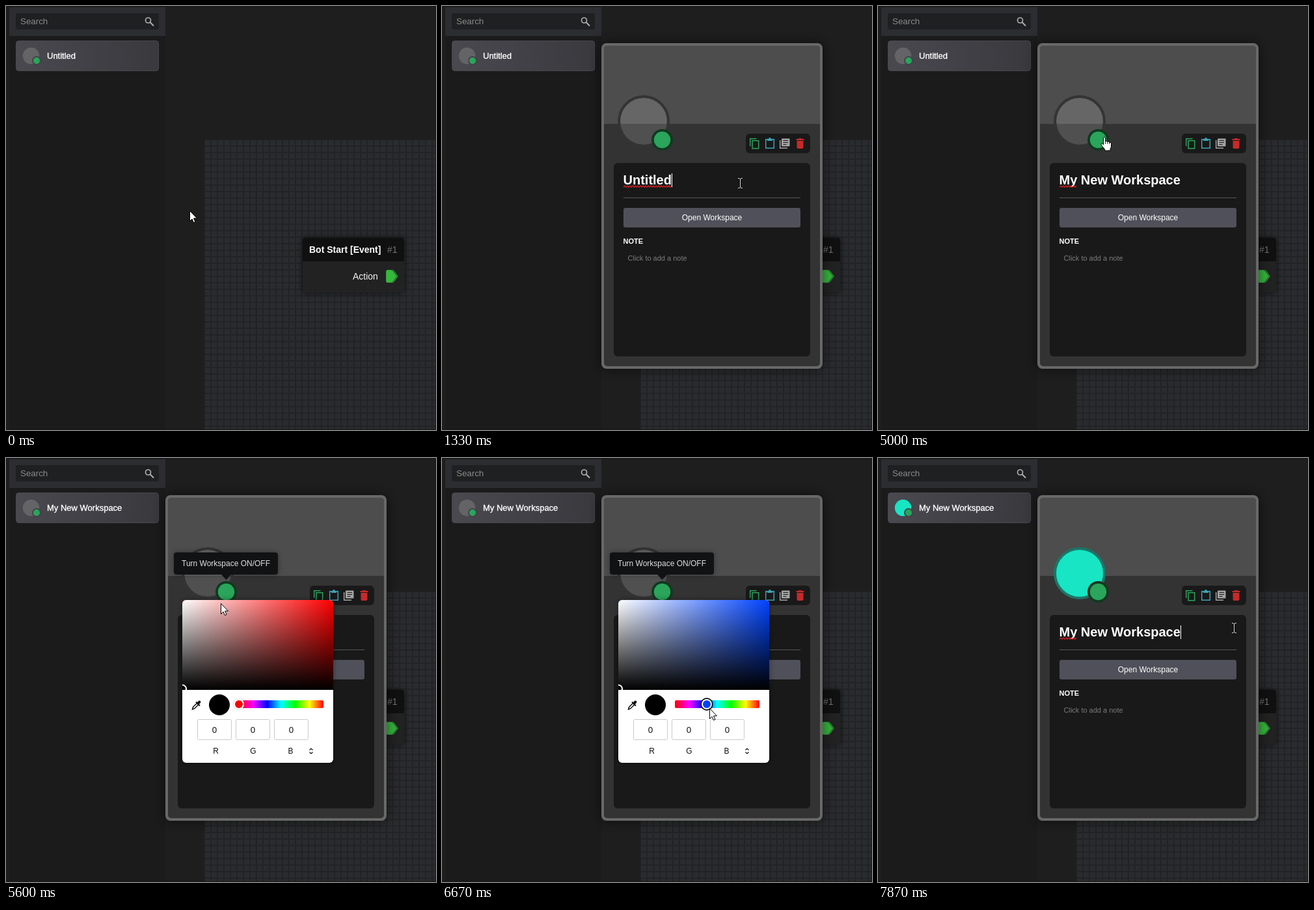
An HTML page with a canvas for the animation above (8 s loop, 661 by 651 pixels).

```html
<!DOCTYPE html>
<html lang="en">
<head>
<meta charset="utf-8">
<title>Workspace editor</title>
<style>
html, body { margin: 0; width: 100%; height: 100%; overflow: hidden; background: #1e1e1e; }
canvas { display: block; }
</style>
</head>
<body>
<canvas id="stage" width="661" height="651"></canvas>
<script>
const ctx = document.getElementById('stage').getContext('2d');
const LOOP = 8000, TICKS = 120, TICK = LOOP / TICKS;
const TITLE = 'My New Workspace';
const SANS = '"Liberation Sans", Arial, sans-serif';
const GREEN = '#2aa55b';
const TITLE_FONT = `bold 20px ${SANS}`;

// Moments, in ticks
const OPEN = 9, FOCUS = 20, SELECT = 24, CLEAR = 27, CARET_OFF = 72;
const PICK = 80, TIP = 82, HUE = 94, HUE_END = 102, SHADE = 107, SHADE_END = 110;
const TIP_OFF = 113, DONE = 118;
const STROKES = [32, 35, 37, 41, 43, 44, 46, 49, 53, 55, 56, 58, 60, 61, 64, 65];

// Pointer path: tick, x, y, shape
const PATH = [
  [0, 282, 314, 'arrow'], [6, 130, 170, 'arrow'], [9, 43, 73, 'hand'], [13, 43, 73, 'arrow'],
  [20, 458, 272, 'beam'], [71, 458, 272, 'arrow'], [75, 347, 201, 'hand'], [76, 347, 201, 'hand'],
  [79, 320, 184, 'hand'], [81, 322, 188, 'arrow'], [92, 365, 378, 'arrow'], [93, 365, 378, 'arrow'],
  [100, 411, 384, 'arrow'], [102, 430.5, 384, 'arrow'], [106, 472, 243, 'arrow'],
  [110, 480, 232, 'arrow'], [112, 480, 232, 'arrow'], [114, 512, 325, 'hand'],
  [116, 547, 261, 'beam'], [120, 547, 261, 'beam']
];

const clamp = v => Math.max(0, Math.min(1, v));

function pointerAt(n) {
  let i = 0;
  while (i < PATH.length - 2 && PATH[i + 1][0] <= n) i++;
  const [t0, x0, y0, shape] = PATH[i], [t1, x1, y1] = PATH[i + 1];
  const u = clamp((n - t0) / (t1 - t0)), k = u * u * (3 - 2 * u);
  return { x: x0 + (x1 - x0) * k, y: y0 + (y1 - y0) * k, shape };
}

function hsv(h, s, v) {
  return [5, 3, 1].map(n => {
    const k = (n + h / 60) % 6;
    return Math.round(255 * v * (1 - s * clamp(Math.min(k, 4 - k))));
  });
}
const rgb = c => `rgb(${c.join(',')})`;

function rect(x, y, w, h, fill) {
  ctx.fillStyle = fill;
  ctx.fillRect(x, y, w, h);
}
function box(x, y, w, h, r, fill, stroke) {
  ctx.beginPath();
  ctx.roundRect(x, y, w, h, r);
  paint(fill, stroke);
}
function disc(x, y, r, fill, stroke, width) {
  ctx.beginPath();
  ctx.arc(x, y, r, 0, 7);
  paint(fill, stroke, width);
}
function shape(d, fill, stroke, width) {
  const p = new Path2D(d);
  if (fill) { ctx.fillStyle = fill; ctx.fill(p); }
  if (stroke) { ctx.strokeStyle = stroke; ctx.lineWidth = width || 1; ctx.stroke(p); }
}
function paint(fill, stroke, width) {
  if (fill) { ctx.fillStyle = fill; ctx.fill(); }
  if (stroke) { ctx.strokeStyle = stroke; ctx.lineWidth = width || 1; ctx.stroke(); }
}
function text(s, x, y, font, fill, align) {
  ctx.font = typeof font === 'number' ? `${font}px ${SANS}` : font;
  ctx.textAlign = align || 'left';
  ctx.fillStyle = fill;
  ctx.fillText(s, x, y);
}
function at(x, y, draw) {
  ctx.save();
  ctx.translate(x, y);
  draw();
  ctx.restore();
}
function shadowed(blur, color, draw) {
  ctx.save();
  ctx.shadowBlur = blur;
  ctx.shadowColor = color;
  draw();
  ctx.restore();
}
function ramp(x0, y0, x1, y1, colors) {
  const g = ctx.createLinearGradient(x0, y0, x1, y1);
  colors.forEach((c, i) => g.addColorStop(i / (colors.length - 1), c));
  return g;
}

function drawBoard() {
  rect(0, 0, 661, 651, '#1e1e1e');
  rect(305, 205, 356, 446, '#222325');
  ctx.fillStyle = '#2a2b2e';
  for (let y = 206; y < 651; y += 10)
    for (let x = 306; x < 661; x += 10) ctx.fillRect(x, y, 8, 8);
  shadowed(10, 'rgba(0,0,0,.6)', () => box(456, 356, 156, 84, 4, '#222223'));
  box(456, 356, 156, 36, [4, 4, 0, 0], '#101010');
  text('Bot Start [Event]', 466, 379, `bold 14px ${SANS}`, '#fff');
  text('#1', 586, 379, 14, '#737373');
  text('Action', 533, 420, 14, '#f4f4f4');
  shape('M587 405H594Q596 405 598 408L603 415L598 422Q596 425 594 425H587Q584 425 584 422V408Q584 405 587 405Z', '#2c7f31');
  shape('M587 405.5H591Q593 405.5 595 408L600 415L595 422Q593 424.5 591 424.5H587Q584.5 424.5 584.5 422V408Q584.5 405.5 587 405.5Z', '#35b83c');
}

function drawSidebar(label, avatar) {
  rect(5, 2, 240, 649, '#1b1b1b');
  rect(5, 2, 240, 44, '#2c2d31');
  box(15, 11, 220, 25, 3, '#1f2022');
  text('Search', 22, 28, 13.33, '#8b8b8b');
  disc(218.5, 22, 4, null, '#b0b0b0', 1.7);
  shape('M221.5 25L227 30.5', null, '#b0b0b0', 2);
  box(15.5, 53.5, 219, 46, 4, ramp(15, 0, 235, 0, ['#49494f', '#39393e']), '#48484d');
  disc(38.5, 76.5, 12.7, avatar || '#646467');
  disc(47, 84, 7, '#434348');
  disc(47, 84, 5, GREEN);
  text(label, 63, 81, 13, '#fff');
  ctx.strokeStyle = '#fff';
  ctx.lineWidth = .35;
  ctx.strokeText(label, 63, 81);
}

function drawTools() {
  box(467, 196, 99, 30, 6, '#191919');
  shape('M473.7 215V203.7H483.5M477 206.7H486.7V218.7H477Z', null, GREEN, 1.5);
  shape('M497.7 204.7H510.3V218.3H497.7Z', null, '#3fa3b5', 1.5);
  shape('M500 204V207H508V204H506Q505.5 202 504 202Q502.500 202 502 204Z', '#3fa3b5');
  shape('M519.700 206V218.300H531', null, '#a3a3a3', 1.500);
  box(522, 203.500, 12.500, 12, 1, '#a3a3a3');
  shape('M524.500 206.500H532M524.500 209.500H532M524.500 212.500H529.500', null, '#191919', 1.200);
  shape('M544.500 204H548L549 203H552L553 204H556.500V206H544.500ZM545.500 207H555.500V217Q555.500 219 553.500 219H547.500Q545.500 219 545.500 217Z', '#c62a2a');
}

function squiggle(x0, x1) {
  ctx.beginPath();
  for (let x = x0, up = 0; x <= x1; x += 2, up ^= 1) ctx.lineTo(x, up ? 275.8 : 278.4);
  paint(null, '#e02020', 1.1);
}

function titleState(n) {
  if (n < CLEAR) return 'Untitled';
  return TITLE.slice(0, STROKES.filter(t => t <= n).length);
}

function drawTitle(n) {
  const s = titleState(n);
  ctx.font = TITLE_FONT;
  const width = ctx.measureText(s).width;
  const selected = n >= SELECT && n < CLEAR;
  if (selected) rect(279, 256, width, 23, '#2f6fd0');
  text(s, 278.5, 274, TITLE_FONT, '#fff');
  const focused = n >= FOCUS && n < PICK || n >= DONE;
  if (!focused) return;
  if (n < CLEAR) squiggle(279, 353);
  else if (n >= STROKES[2]) squiggle(279, 306);
  const caret = !selected && (n <= CARET_OFF || n >= DONE);
  if (caret) rect(Math.round(278.5 + width), 257, 1, 21, '#fff');
}

function drawModal(n, color, pointer) {
  shadowed(20, 'rgba(0,0,0,.6)', () => box(245, 57, 340, 500, 8, '#686868'));
  box(249, 61, 332, 492, 5, '#333');
  box(249, 61, 332, 120, [5, 5, 0, 0], '#4d4d4d');
  if (color) {
    disc(310, 177, 38, color, rgb([27, 117, 103]), 4);
  } else {
    disc(310, 177, 36, 'rgba(255,255,255,.14)');
    disc(310, 177, 38, null, '#343434', 4);
  }
  disc(338.5, 205.5, 16.5, '#11381f');
  disc(338.5, 205.5, 12.7, GREEN);
  drawTools();
  box(264, 241, 302, 297, 6, '#191919');
  drawTitle(n);
  rect(279, 294, 272, 1, '#585858');
  const hover = pointer.shape === 'hand' && pointer.y > 308 && pointer.y < 340;
  box(279, 310, 272, 30, 3, hover ? '#5c5c66' : '#50505a');
  text('Open Workspace', 415, 329, 12, '#fff', 'center');
  text('NOTE', 278.5, 365, `bold 11px ${SANS}`, '#fff');
  text('Click to add a note', 285.5, 391, 11, '#7b7b7b');
}

function drawTip() {
  shadowed(8, 'rgba(0,0,0,.35)', () => box(258, 145, 160, 34, 4, '#111214'));
  shape('M331 179H346L338.500 187Z', '#111214');
  text('Turn Workspace ON/OFF', 270, 166, 12, '#e0e0e0');
}

function drawPicker(n, hue, sat, val) {
  const color = hsv(hue, sat, val), pure = rgb(hsv(hue, 1, 1));
  shadowed(8, 'rgba(0,0,0,.4)', () => box(271, 218, 232, 250, 6, '#fff'));
  ctx.save();
  ctx.beginPath();
  ctx.roundRect(271, 218, 232, 138, [6, 6, 0, 0]);
  ctx.clip();
  rect(271, 218, 232, 138, pure);
  rect(271, 218, 232, 138, ramp(271, 0, 503, 0, ['#fff', 'rgba(255,255,255,0)']));
  rect(271, 218, 232, 138, ramp(0, 218, 0, 356, ['rgba(0,0,0,0)', '#000']));
  const sx = 271 + 232 * sat, sy = Math.min(354.5, 356 - 138 * val);
  if (n >= SHADE) disc(sx, sy, 8, null, '#000', 2);
  disc(sx, sy, 6, rgb(color), '#fff', 2);
  ctx.restore();

  at(285, 371, () => {
    shape('M1.500 15L2.500 11.500L8.500 5.500L10.700 7.700L4.700 13.700Z', null, '#111', 1.500);
    shape('M7 3.500L13 9.500', null, '#111', 2);
    shape('M10 6L12.500 3.500', null, '#111', 4);
    disc(12.300, 3.500, 2, '#111');
  });
  disc(328, 379, 16, rgb(color));
  box(358, 372, 130, 12, 2, ramp(358, 0, 488, 0, ['#f00', '#f0f', '#00f', '#0ff', '#0f0', '#ff0', '#f00']));
  const hx = 488 - 130 * hue / 360;
  if (n >= HUE && n < SHADE) disc(hx, 378, 9.700, '#000');
  else shadowed(2, 'rgba(0,0,0,.4)', () => disc(hx, 378, 8, '#fff'));
  disc(hx, 378, 8, '#fff');
  disc(hx, 378, 6, pure);
  color.forEach((v, i) => {
    const x = 294 + 59 * i;
    box(x + .5, 401.5, 52, 31, 2, '#fff', '#cacaca');
    text(v, x + 26.5, 422, 13.33, '#111', 'center');
    text('RGB'[i], 322.5 + 57.5 * i, 454, 12, '#111', 'center');
  });
  shape('M466.500 448.500L469 446L471.500 448.500M466.500 451.500L469 454L471.500 451.500', null, '#111', 1.200);
}

function drawPointer(p) {
  at(Math.round(p.x), Math.round(p.y), () => {
    if (p.shape === 'arrow') {
      shape('M.5 .5V16.500L4 13L6.500 18.500L9 17.500L6.500 12H11.500Z', '#fff', '#000');
    } else if (p.shape === 'beam') {
      const d = 'M-3 -7.500H-1L.5 -6.500L2 -7.500H4M.5 -6.500V6.500M-3 7.500H-1L.5 6.500L2 7.500H4';
      shape(d, null, '#000', 2.400);
      shape(d, null, '#e8e8e8', 1);
    } else {
      shape('M-.5 1.500Q1 -1 2.500 1.500V7Q4.500 5.500 5.500 7.500Q7.500 6 8.500 8.500Q11 7.500 11.500 10.500V15Q11 17 10 18.500V21H1.500V19Q-2 15 -4 12Q-4.500 9.500 -2.500 10L-.5 12Z', '#fff', '#000');
      shape('M2.500 7V11M5.500 8V11M8.500 9V11', null, '#000', .8);
    }
  });
}

function render(n) {
  const p = pointerAt(n);
  const grabX = pointerAt(Math.min(n, HUE_END)).x - 4;
  const hueX = n < HUE ? 358 : grabX;
  const hue = 360 * (1 - (hueX - 358) / 130);
  const shade = pointerAt(Math.min(n, SHADE_END));
  const chosen = n >= SHADE;
  const sat = chosen ? (shade.x - 271) / 232 : 0;
  const val = chosen ? 1 - (shade.y - 218) / 138 : 0;
  const color = chosen ? rgb(hsv(hue, sat, val)) : null;

  drawBoard();
  drawSidebar(n < PICK ? 'Untitled' : TITLE, n >= DONE ? color : null);
  rect(0, 0, 661, 1, '#181818');
  rect(660, 0, 1, 651, '#181818');
  rect(0, 650, 661, 1, '#181818');

  if (n > OPEN) {
    const k = clamp((n - OPEN) / 4);
    if (k < 1) drawFaded(k, () => drawModal(n, color, p));
    else drawModal(n, color, p);
  }
  if (n >= TIP && n <= TIP_OFF + 1) {
    const k = clamp(Math.min((n - TIP + 1) / 3, (TIP_OFF + 2 - n) / 3));
    drawFaded(k, drawTip);
  }
  if (n >= PICK && n < DONE) drawPicker(n, hue, sat, val);
  drawPointer(p);
}

// Blends a finished layer so overlapping parts do not show through each other.
function drawFaded(alpha, draw) {
  const back = document.createElement('canvas');
  back.width = 661;
  back.height = 651;
  back.getContext('2d').drawImage(ctx.canvas, 0, 0);
  draw();
  ctx.globalAlpha = 1 - alpha;
  ctx.drawImage(back, 0, 0);
  ctx.globalAlpha = 1;
}

const start = performance.now();
let last = -1;
function loop() {
  const t = (performance.now() - start) % LOOP;
  const n = Math.floor((t + 4) / TICK) % TICKS;
  if (n !== last) render(last = n);
  requestAnimationFrame(loop);
}
loop();
</script>
</body>
</html>
```
